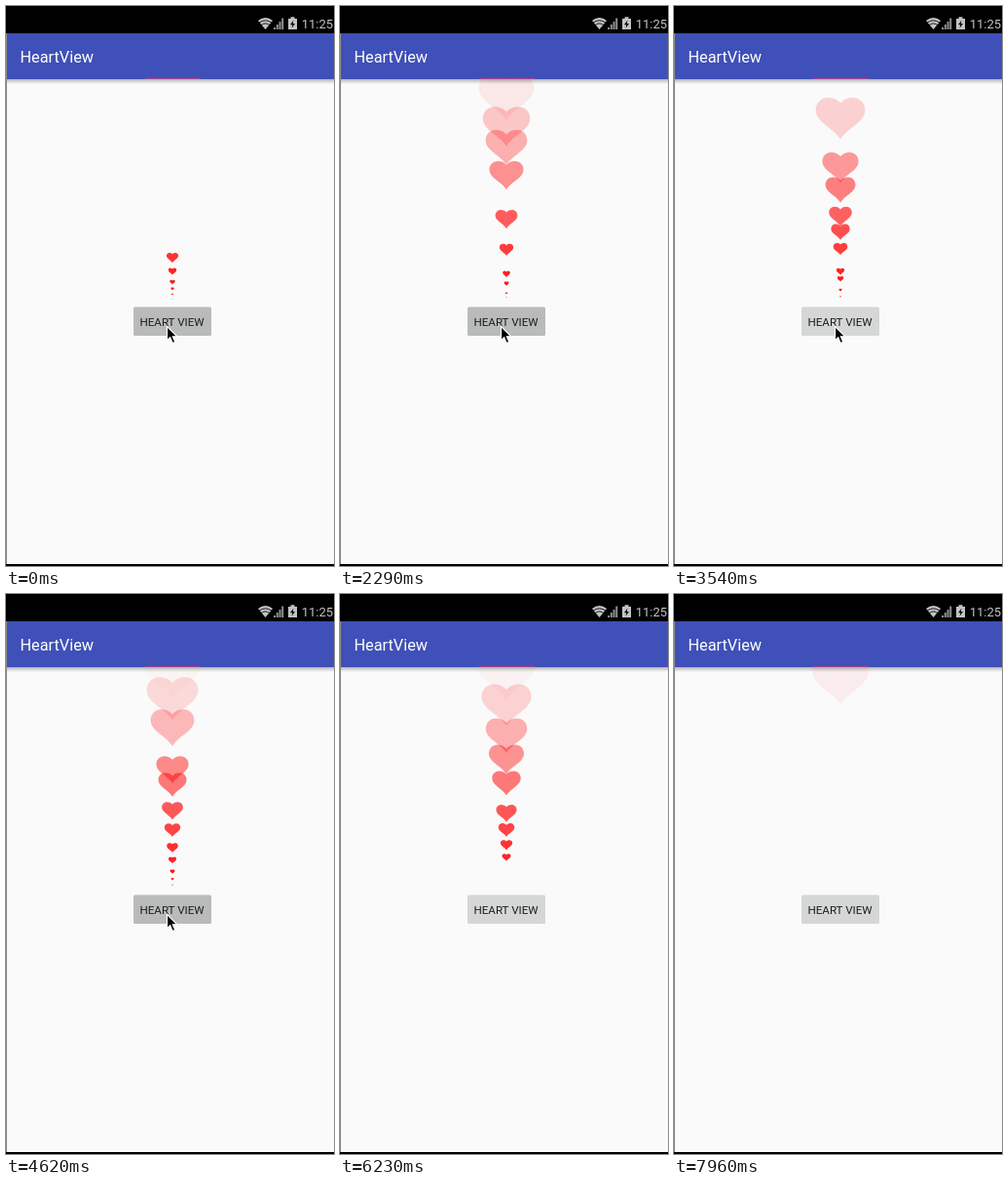
An HTML page for the animation above (8.73 s loop, 337 by 574 pixels).

```html
<!DOCTYPE html>
<html lang="en">
<head>
<meta charset="utf-8">
<title>HeartView</title>
<style>
  html, body { margin: 0; width: 100%; height: 100%; overflow: hidden; background: #fafafa; }
  svg { display: block; width: 337px; height: 574px; font-family: Roboto, "Noto Sans", sans-serif; }
</style>
</head>
<body>
<svg viewBox="0 0 337 574">
  <defs>
    <linearGradient id="shade" x2="0" y2="1">
      <stop stop-color="#000" stop-opacity=".28"/>
      <stop offset="1" stop-color="#000" stop-opacity="0"/>
    </linearGradient>
    <path id="heart" d="M0-.31C-.07-.39-.16-.42-.25-.42C-.4-.42-.5-.31-.5-.17C-.5.08-.14.18 0 .42C.14.18.5.08.5-.17C.5-.31.4-.42.25-.42C.16-.42.07-.39 0-.31Z"/>
  </defs>

  <rect width="337" height="574" fill="#fafafa"/>
  <g id="hearts" fill="#f00"></g>

  <rect id="button" x="131" y="308.5" width="80" height="29.5" rx="1.5"/>
  <text x="137.5" y="328" font-size="11.6" fill="#1c1c1c">HEART VIEW</text>

  <rect y="75" width="337" height="5" fill="url(#shade)"/>
  <rect y="28" width="337" height="47" fill="#3f50b8"/>
  <rect x="143" y="74" width="57" height="1" fill="#a0468f"/>
  <text x="14.5" y="58" font-size="16.3" fill="#fff">HeartView</text>
  <path d="M.5 28V574" stroke="#8c8c8c"/>
  <rect y="572" width="337" height="2"/>

  <rect width="337" height="28"/>
  <g fill="#c4c4c4">
    <path d="M259 15Q266.500 9 274 15L266.500 24Z"/>
    <path d="M260 17.200Q266.500 12.500 273 17.200M262 19.700Q266.500 16.200 271 19.700" fill="none" stroke="#000" stroke-width=".9"/>
    <path d="M275 24v-2h2v2zM277.800 24v-5h2v5zM280.500 24v-8h2v8zM283.200 24v-11.500h2v11.500z" fill="#8e8e8e"/>
    <path d="M290 13h2.500v-1.800h4v1.800h2.500v11h-9z"/>
    <path d="M295.500 14.500L292 19.200H294.300L293.500 22.800L297 18H294.700Z" fill="#000"/>
    <text x="303.700" y="23" font-size="13">11:25</text>
  </g>

  <path id="cursor" d="M0 0V14.200L3.200 11.200L5.600 17L8.200 15.900L5.800 10.300H10.300Z" stroke="#fff" stroke-width="1.100"/>
</svg>
<script>
  const LOOP = 8.73, LAST_MOVE = 7.96, LIFE = 3;
  const START_Y = 303, SPEED = 5.13, FADE = 226;
  const launches = [
    -1.306, -1.083, -.869, -.705, -.53, -.32, -.16, .075, .5, .87,
    1.255, 1.455, 1.72, 1.895, 2.11, 2.46, 2.6, 2.87, 3.1, 3.345,
    3.55, 3.783, 3.98, 4.195, 4.508, 4.708, 4.915, 5.11
  ];
  const byId = id => document.getElementById(id);
  const button = byId("button"), cursor = byId("cursor");

  const hearts = launches.map(() => {
    const el = document.createElementNS("http://www.w3.org/2000/svg", "use");
    el.setAttribute("href", "#heart");
    return byId("hearts").appendChild(el);
  });

  // Each heart accelerates upwards; size and fading follow its height.
  function moveHeart(el, age) {
    const rise = (SPEED * Math.max(age, 0)) ** 2;
    const alive = age > .2 && age < LIFE && rise < FADE;
    el.setAttribute("opacity", alive ? 1 - rise / FADE : 0);
    el.setAttribute("transform", `translate(171 ${START_Y - rise}) scale(${Math.max(rise * .27, .01)})`);
  }

  // The button is held just before each launch and released at it.
  function isPressed(t) {
    const near = (from, to) => launches.some(l => t >= l + from && t < l + to);
    return near(-.18, -.02) && !near(-.02, .06);
  }

  function draw(t) {
    hearts.forEach((el, i) => moveHeart(el, t - launches[i]));
    button.setAttribute("fill", isPressed(t) ? "#b9bbba" : "#d5d6d6");
    const leave = Math.min(Math.max((t - 5.3) / .45, 0), 1);
    cursor.setAttribute("transform", `translate(${165.5 + 180 * leave ** 2} 328.5)`);
  }

  const begin = performance.now();
  function tick() {
    const t = (performance.now() - begin) / 1000 % LOOP;
    draw(Math.min(t, LAST_MOVE));
    requestAnimationFrame(tick);
  }
  tick();
</script>
</body>
</html>
```
